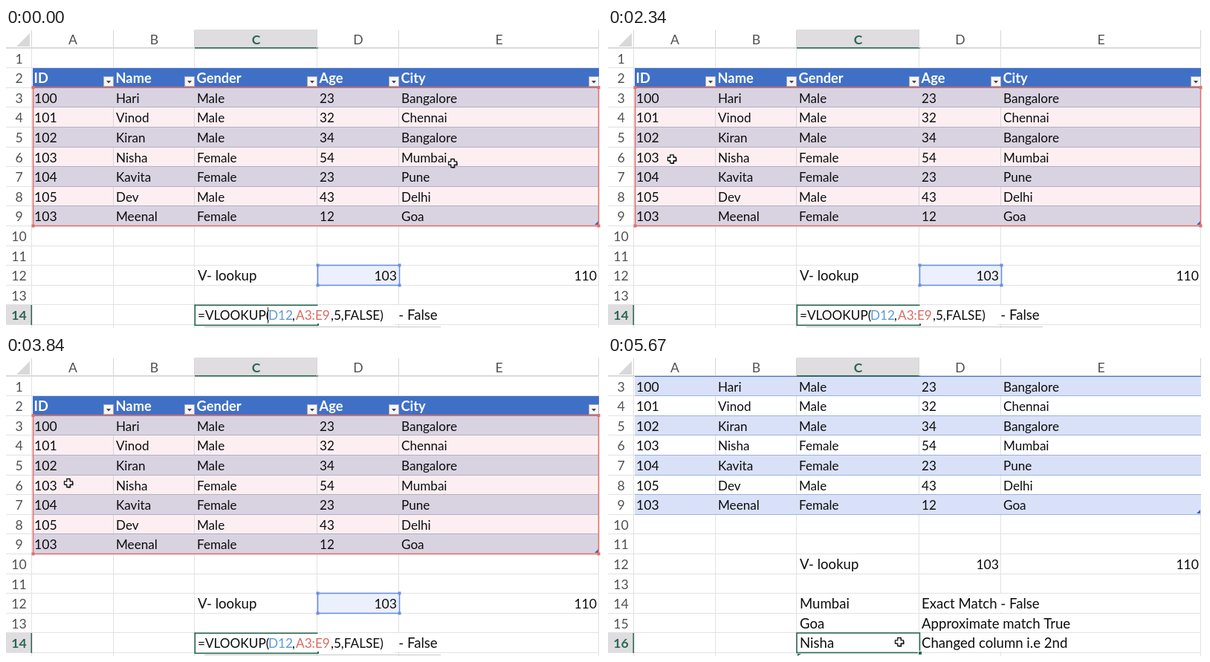
Recreate the animation shown at these times as an HTML page with a canvas. Size 802 by 404 pixels, loop 6.67 s.

```html
<!DOCTYPE html>
<html lang="en">
<head>
<meta charset="utf-8">
<title>Lookup in a sheet</title>
<style>
html, body { margin: 0; width: 100%; height: 100%; overflow: hidden; background: #fff; }
canvas { display: block; }
</style>
</head>
<body>
<canvas id="sheet" width="802" height="404"></canvas>
<script>
const ctx = document.getElementById('sheet').getContext('2d');
const LOOP = 6670, FPS = 6;
const edges = [35, 145, 254, 419, 529, 798];
const GREEN = '#2b6850', BLUE = '#6c90dc', RED = '#e0706c', INK = '#0c0c0c';
const BIG = 18.6, SMALL = 17.1, DIGITS = 17.6;

const headings = ['ID', 'Name', 'Gender', 'Age', 'City'];
const people = [
  ['100', 'Hari', 'Male', '23', 'Bangalore'],
  ['101', 'Vinod', 'Male', '32', 'Chennai'],
  ['102', 'Kiran', 'Male', '34', 'Bangalore'],
  ['103', 'Nisha', 'Female', '54', 'Mumbai'],
  ['104', 'Kavita', 'Female', '23', 'Pune'],
  ['105', 'Dev', 'Male', '43', 'Delhi'],
  ['103', 'Meenal', 'Female', '12', 'Goa']
];

// Pointer stops: tick, x, y
const stops = [
  [6, 601, 182], [11, 95, 178], [18, 72, 174], [23, 84, 171],
  [27, 315, 383], [30, 306, 373], [34, 392, 385]
];

function rect(x, y, w, h, color) {
  ctx.fillStyle = color;
  ctx.fillRect(x, y, w, h);
}

function text(str, x, y, { size = BIG, color = INK, align = 'left', bold = false } = {}) {
  ctx.font = `${bold ? 'bold ' : ''}${size}px Lato, sans-serif`;
  ctx.fillStyle = color;
  ctx.textAlign = align;
  ctx.fillText(str, x, y);
}

function shape(points, fill, stroke) {
  ctx.beginPath();
  points.forEach(([x, y]) => ctx.lineTo(x, y));
  ctx.closePath();
  ctx.fillStyle = fill;
  ctx.fill();
  if (stroke) {
    ctx.strokeStyle = stroke;
    ctx.lineWidth = 1.3;
    ctx.stroke();
  }
}

function frame(x, y, right, bottom, color, width = 1.6) {
  ctx.strokeStyle = color;
  ctx.lineWidth = width;
  ctx.strokeRect(x, y, right - x, bottom - y);
}

function rangeFrame(x, y, right, bottom, color) {
  frame(x, y, right, bottom, color);
  for (const hx of [x, right])
    for (const hy of [y, bottom]) rect(hx - 2, hy - 2, 4, 4, color);
}

function drawGrid(top) {
  for (let r = 1; r <= 18; r++) rect(0, top(r) - 1, 798, 1, '#e2e2e2');
  for (const x of edges) rect(x - 1, 28, 1, 376, '#e0e3e0');
}

function drawTable(top, editing) {
  rect(36, top(2), 762, top(3) - top(2), '#4070c6');
  headings.forEach((name, c) => {
    const x = edges[c + 1] - 14, y = top(2) + 11;
    text(name, edges[c] + 2.5, top(2) + 20, { size: 18.3, color: '#fff', bold: true });
    rect(x, y, 14, 14, '#a5aab8');
    rect(x + 1, y + 1, 12, 12, '#f6f6f8');
    shape([[x + 4, y + 6], [x + 10, y + 6], [x + 7, y + 9.5]], '#444');
  });
  people.forEach((person, i) => {
    const r = i + 3, y = top(r), h = top(r + 1) - y;
    const colors = editing ? ['#d9d3e1', '#fdeff1'] : ['#d9e1f8', '#fff'];
    rect(36, y, 762, h, colors[i % 2]);
    for (const x of edges.slice(1, 5)) rect(x - 1, y, 1, h, editing ? '#d8d4dc' : '#dde0e8');
    rect(36, y + h - 1, 762, 1, editing ? '#b3aec4' : '#9db3df');
    person.forEach((value, c) =>
      text(value, edges[c] + 3, y + 20, { size: c ? SMALL : DIGITS }));
  });
  const end = top(10);
  shape([[797, end - 7], [797, end - 2], [792, end - 2]], '#4060b5');
  if (editing) rangeFrame(36.5, 80, 797.5, 266.5, RED);
}

function drawFormula() {
  rect(255, 374, 268, 26, '#fff');
  rect(253.5, 372.5, 166, 1.6, GREEN);
  rect(253.5, 399.5, 166, 1.6, GREEN);
  rect(253.5, 372.5, 1.6, 28, GREEN);
  rect(419, 398, 2, 3, GREEN);
  rect(267, 402, 318, 1, '#c8c8c8');
  const size = 17.2, y = 393;
  text('=VLOOKUP(', 258, y, { size });
  text('D12', 353, y, { size, color: '#5b9bd5' });
  text(',', 385, y, { size });
  text('A3:E9', 390, y, { size, color: '#d86a60' });
  text(',5,FALSE)', 437, y, { size });
}

function drawNotes(top, tick, editing, active) {
  const label = (str, r) => text(str, 258, top(r) + 20);
  // Long text in D runs over the line between D and E
  const note = (str, r) => {
    rect(528, top(r), 1, 25, '#fff');
    text(str, 422, top(r) + 20);
  };
  const number = (str, right) =>
    text(str, right, top(12) + 20, { size: DIGITS, align: 'right' });

  if (editing) {
    rect(420, 320, 109, 26, '#ebf0fc');
    rangeFrame(419.5, 319.5, 529.5, 346.5, BLUE);
  }
  label('V- lookup', 12);
  number('103', 526);
  number('110', 795);
  note('Exact Match - False', 14);
  if (editing) {
    drawFormula();
    if (tick < 14) rect(352, 376, 1, 22, '#333');
    return;
  }
  label('Mumbai', 14);
  label('Goa', 15);
  note('Approximate match True', 15);
  if (active === 16) {
    label('Nisha', 16);
    note('Changed column i.e 2nd', 16);
    shape([[255, 401], [260, 401], [255, 404]], GREEN);
  }
  frame(254, 373, 419.5, 399.5, GREEN);
  rect(417, 397, 5, 5, '#fff');
  rect(418, 398, 4, 4, GREEN);
}

function drawHeaders(top, scroll, active) {
  rect(0, 0, 802, 27, '#fff');
  rect(0, 26, 798, 1, '#d2d2d2');
  rect(254, 2, 165, 25, '#dfdddf');
  rect(254, 26, 166, 1.6, GREEN);
  for (const x of edges) rect(x - 1, 3, 1, 24, '#d6d6d6');
  shape([[32, 7], [32, 25], [14, 25]], '#d8d8d8');
  [...'ABCDE'].forEach((letter, c) => text(letter, (edges[c] + edges[c + 1]) / 2, 22,
    { size: DIGITS, align: 'center', bold: c === 2, color: c === 2 ? GREEN : '#505050' }));
  for (let r = scroll + 1; r <= active; r++) {
    const on = r === active;
    if (on) {
      rect(0, top(r), 34, 26, '#e0dde0');
      rect(33.5, top(r), 1.6, 27, GREEN);
    }
    text(r, 17.5, top(r) + 20,
      { size: DIGITS, align: 'center', bold: on, color: on ? GREEN : '#505050' });
  }
}

function pointerAt(tick) {
  if (tick <= stops[0][0]) return stops[0].slice(1);
  const i = stops.findIndex(s => s[0] >= tick);
  if (i < 0) return stops.at(-1).slice(1);
  const [t0, x0, y0] = stops[i - 1], [t1, x1, y1] = stops[i];
  const u = (tick - t0) / (t1 - t0), k = u * u * (3 - 2 * u);
  return [x0 + (x1 - x0) * k, y0 + (y1 - y0) * k];
}

function drawCross(x, y) {
  const a = 2.2, b = 5.5;
  const plus = [[-a, -b], [a, -b], [a, -a], [b, -a], [b, a], [a, a],
    [a, b], [-a, b], [-a, a], [-b, a], [-b, -a], [-a, -a]];
  shape(plus.map(([px, py]) => [x + px + 1, y + py + 1]), '#111');
  shape(plus.map(([px, py]) => [x + px, y + py]), '#fff', '#111');
}

function drawMoveArrow(x, y) {
  const cx = x - 1, cy = y - 5;
  rect(cx - 6, cy - 0.5, 12, 1, '#111');
  rect(cx - 0.5, cy - 6, 1, 12, '#111');
  for (const s of [-1, 1]) {
    shape([[cx + 7 * s, cy], [cx + 4 * s, cy - 2.5], [cx + 4 * s, cy + 2.5]], '#111');
    shape([[cx, cy + 7 * s], [cx - 2.5, cy + 4 * s], [cx + 2.5, cy + 4 * s]], '#111');
  }
  shape([[0, -5], [0, 8], [2.5, 5.5], [4.5, 10], [6.5, 9], [4.5, 5], [8, 4.5]]
    .map(([px, py]) => [x + px - 1, y + py]), '#fff', '#111');
}

function draw(time) {
  const tick = Math.floor((time % LOOP + 4) * FPS / 1000);
  const scroll = tick < 25 ? 0 : tick < 32 ? 1 : 2;
  const active = 14 + scroll, editing = scroll === 0;
  const top = r => Math.round(27.5 + 26.6 * (r - 1 - scroll));
  rect(0, 0, 802, 404, '#fff');
  drawGrid(top);
  drawTable(top, editing);
  drawNotes(top, tick, editing, active);
  drawHeaders(top, scroll, active);
  const [x, y] = pointerAt(tick);
  (tick >= 26 && tick <= 28 ? drawMoveArrow : drawCross)(x, y);
}

const start = performance.now();
function loop() {
  draw(performance.now() - start);
  requestAnimationFrame(loop);
}
loop();
</script>
</body>
</html>
```
